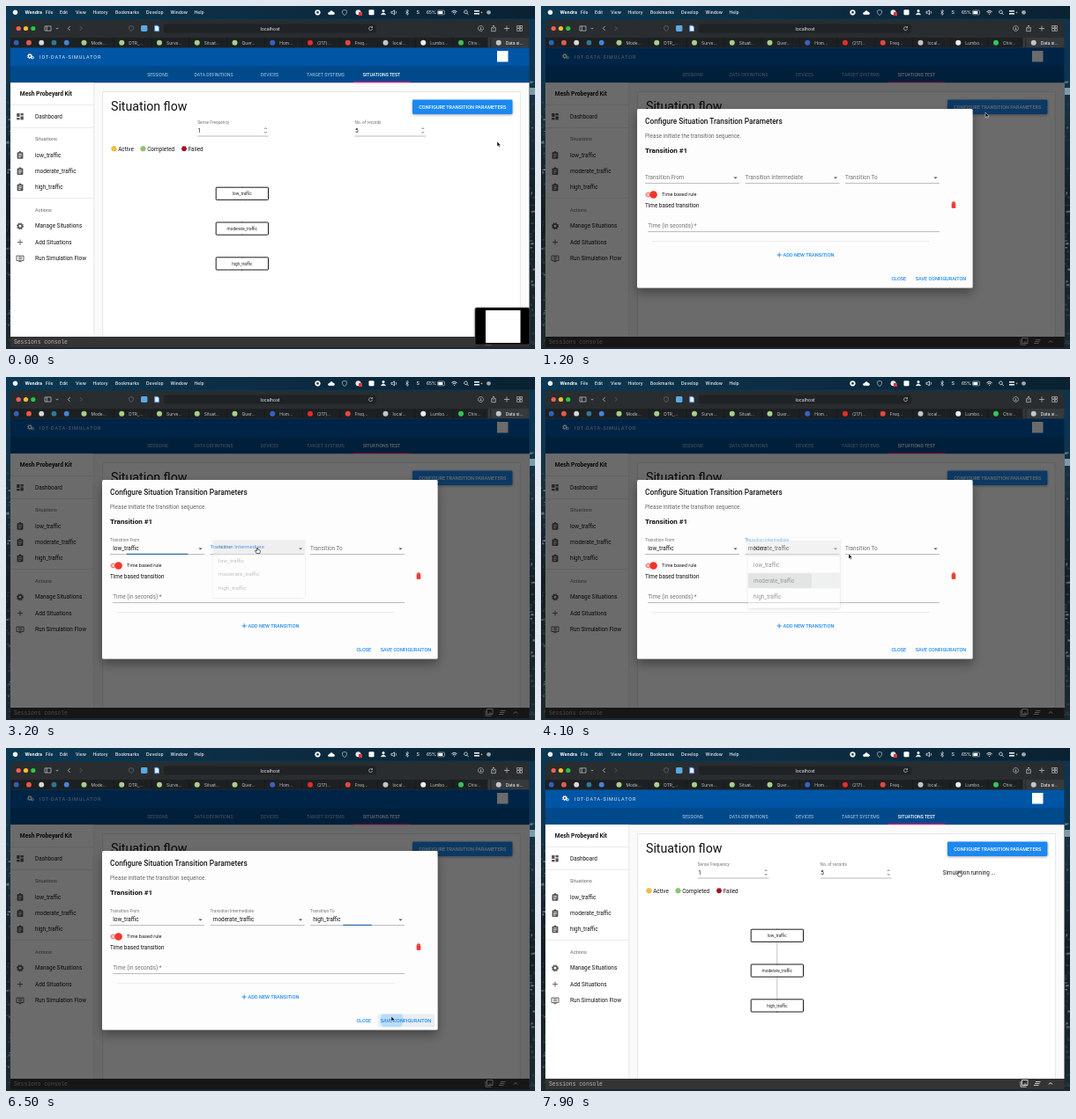
Animation, 600 px wide and 390 px high, one loop 8000 ms. Source, as an HTML page:

```html
<!DOCTYPE html>
<html lang="en">
<head>
<meta charset="utf-8">
<title>Situation flow</title>
<style>
  html, body { margin: 0; height: 100%; overflow: hidden; background: #0c2b40; }
  svg { display: block; width: 100vw; height: 100vh; }
  text { font-family: Roboto, sans-serif; white-space: pre; }
  .ui { font-family: Inter, sans-serif; }
  .mono { font-family: "Liberation Mono", monospace; }
</style>
</head>
<body>
<svg viewBox="0 0 600 390">
  <defs>
    <linearGradient id="wall" x2="0" y2="1">
      <stop offset="0" stop-color="#0d3550"/><stop offset=".2" stop-color="#0e3550"/>
      <stop offset=".3" stop-color="#18303e"/><stop offset=".6" stop-color="#141d24"/>
      <stop offset="1" stop-color="#1b2930"/>
    </linearGradient>
    <linearGradient id="bar">
      <stop offset="0" stop-color="#0b3853"/><stop offset=".5" stop-color="#0d2c42"/>
      <stop offset="1" stop-color="#0a2231"/>
    </linearGradient>
    <filter id="soft" x="-10%" y="-10%" width="120%" height="130%">
      <feDropShadow dx="0" dy="1" stdDeviation="1.4" flood-opacity=".35"/>
    </filter>
    <filter id="deep" x="-10%" y="-10%" width="120%" height="130%">
      <feDropShadow dx="0" dy="6" stdDeviation="6" flood-opacity=".35"/>
    </filter>
  </defs>
  <g id="page"></g>
  <g id="live"></g>
</svg>
<script>
const BLUE = '#1e88f0', INK = '#161616', GREY = '#757575', RED = '#f3352f';
const LOOP = 8000, TICK = 100;
const OPTIONS = ['None', 'low_traffic', 'moderate_traffic', 'high_traffic'];

// Markup helpers
const rect = (x, y, w, h, fill, extra = '') =>
  `<rect x="${x}" y="${y}" width="${w}" height="${h}" fill="${fill}" ${extra}/>`;
const dot = (x, y, r, fill, extra = '') => `<circle cx="${x}" cy="${y}" r="${r}" fill="${fill}" ${extra}/>`;
const text = (x, y, size, str, fill = INK, extra = '') =>
  `<text x="${x}" y="${y}" font-size="${size}" fill="${fill}" ${extra}>${str}</text>`;
const line = (x1, y1, x2, y2, color, w = .6) =>
  `<path d="M${x1} ${y1}L${x2} ${y2}" stroke="${color}" stroke-width="${w}"/>`;
const icon = (x, y, d, color, w = .8, fill = 'none') =>
  `<path transform="translate(${x} ${y})" d="${d}" stroke="${color}" stroke-width="${w}" fill="${fill}"/>`;
const group = (opacity, body, extra = '') => opacity > 0 ? `<g opacity="${opacity}" ${extra}>${body}</g>` : '';
const MEDIUM = 'font-weight="500"', BOLD = 'font-weight="700"', MID = 'text-anchor="middle"';

const PLUS = 'M-3 0H3M0-3V3';
const RING = 'M2.3 0A2.3 2.3 0 1 1 2.3-.1Z';
const CHEVRON = 'M-2 1L0-1L2 1';

// Motion helpers
const clamp = v => Math.max(0, Math.min(1, v));
const ramp = (t, from, length) => clamp((t - from) / length);
const ease = p => p * p * (3 - 2 * p);

// Rocky desktop showing at the window's edges
function wallpaper() {
  let seed = 7, out = rect(0, 0, 600, 390, 'url(#wall)');
  const random = () => (seed = seed * 16807 % 2147483647) / 2147483647;
  for (let i = 0; i < 120; i++) {
    const x = (i % 2 ? 593.5 : 0) + random() * 4, y = 85 + random() * 300;
    out += rect(x, y, 1 + random() * 3, .6 + random() * 2, random() < .2 ? '#8fa0a6' : '#33444d', 'opacity=".6"');
  }
  return out + rect(594, 93, 6, 8, '#7d9ca8');
}

function menuBar() {
  const menus = [['File', 45], ['Edit', 61], ['View', 79], ['History', 98.5], ['Bookmarks', 124],
    ['Develop', 159], ['Window', 186.5], ['Help', 213.5]];
  return rect(0, 0, 600, 14.5, 'url(#bar)') +
    dot(10.5, 7.3, 2.7, '#f4f4f4') +
    text(21.5, 9.2, 5.1, 'Wendra', '#fff', 'class="ui" font-weight="700"') +
    menus.map(([s, x]) => text(x, 9.2, 5, s, '#f2f2f2', 'class="ui" font-weight="500"')).join('') +
    dot(353.5, 7.3, 3.1, '#fff') + rect(352.3, 6.1, 2.4, 2.4, '#173347') +
    icon(369, 7.5, 'M-3 2.2Q-5 0-2-.6Q0-4 2-.8Q5 0 3 2.2Z', '#fff', .3, '#fff') +
    icon(384, 7.3, 'M0-3L2.5-2V0Q2 2.5 0 3.3Q-2 2.5-2.5 0V-2Z', '#b5c1c8', .7) +
    dot(399.5, 7.3, 3, '#e8e8e8') + rect(400, 7, 4, 4, '#d93636') +
    rect(411.5, 4.3, 6, 6, '#fff', 'rx="1"') +
    dot(428, 5.5, 1.5, '#fff') + icon(428, 9.8, 'M-2.8 0Q0-4 2.8 0Z', '#fff', .4, '#fff') +
    icon(440, 7.3, 'M-3-1H-1.5L.5-2.5V2.5L-1.5 1H-3ZM2-1.5Q3.2 0 2 1.5', '#fff', .7) +
    icon(455, 7.3, 'M-1.6-1.5L1.6 1.5L0 3V-3L1.6-1.5L-1.6 1.5', '#fff', .6) +
    text(465.5, 9.4, 5.6, 'S', '#fff') +
    text(477, 9.2, 5, '65%', '#fff', 'class="ui"') +
    rect(489.5, 5, 8, 4.8, 'none', 'rx="1" stroke="#ccc" stroke-width=".6"') + rect(490.3, 5.8, 5, 3.2, '#fff') +
    icon(508.5, 8, 'M-3-1.5Q0-4 3-1.5M-1.8 0Q0-1.8 1.8 0M-.4 1.4H.4', '#fff', .9) +
    icon(521.5, 6.8, 'M1.8 0A1.8 1.8 0 1 1 1.8-.1M1.3 1.3L3 3', '#fff') +
    icon(534, 7.3, 'M-3-1.5H3M-3 1.5H3', '#fff', 1.4) + dot(539.5, 7.3, .9, '#f2a02d') + dot(547.5, 7.3, 2.4, '#9aa7b5');
}

function browser() {
  const pins = ['#2c62bd', '#e45a4f', '#d8d8d8', '#2f7897', '#4485da'];
  const tabs = [['Mode...', '#a6d08a'], ['DTR_...', '#a6d08a'], ['Surve...', '#a6d08a'], ['Situat...', '#a6d08a'],
    ['Quer...', '#a6d08a'], ['Hom...', '#3563c7'], ['(217)...', '#e52d27'], ['Freq...', '#e4473f'],
    ['local...', '#c5c5c5'], ['Lumbo...', '#eeeeee'], ['Chiv...', '#35c45b'], ['Data si...', '#c5c5c5']];
  const c = '#c9c9c9';
  return rect(5, 16, 588.5, 372, '#292d2f', 'rx="4"') + rect(5, 36, 588.5, 11.5, '#1d2022') +
    ['#ff5f57', '#febc2e', '#28c840'].map((f, i) => dot(14.2 + i * 8.3, 25.5, 2.6, f)).join('') +
    icon(47.5, 25.5, 'M-3.5-2.6H3.5V2.6H-3.5ZM-1.2-2.6V2.6', c, .7) + icon(58, 25.5, 'M-1.3-.7L0 .7L1.3-.7', c, .7) +
    icon(71.5, 25.5, 'M1.2-2.4L-1.2 0L1.2 2.4', c) + icon(85, 25.5, 'M-1.2-2.4L1.2 0L-1.2 2.4', '#666') +
    icon(142, 25.5, 'M0-3L2.4-2V0Q2 2.4 0 3Q-2 2.4-2.4 0V-2Z', '#6a6a6a', .7) +
    rect(153, 22, 7.4, 7, '#5aa9e0', 'rx="1.4"') + icon(171, 25.5, 'M-2.3-3.2H1L2.5-1.5V3.2H-2.3Z', '#4d91ef', .9, '#e9f2ff') +
    rect(179, 20.5, 241, 10, '#1f2325', 'rx="2.2"') +
    text(299.5, 27.6, 5.2, 'localhost', '#f0f0f0', `class="ui" ${MID}`) +
    icon(413.5, 25.5, 'M1.7-1A2 2 0 1 0 2 .5M2-2.4V-.8H.5', c, .7) +
    icon(538.5, 25.5, 'M3 0A3 3 0 1 1 3-.1M0-1.6V1.5M-1.2.4L0 1.6L1.2.4', c, .6) +
    icon(553, 25.5, 'M-1-1H-2.3V3.2H2.3V-1H1M0 1V-3.4M-1.3-2.2L0-3.5L1.3-2.2', c, .7) +
    icon(568, 25.5, PLUS, c, .7) +
    [-1.7, 1.7].map(a => [-1.7, 1.7].map(b => rect(581.4 + a, 24 + b, 2.6, 2.6, 'none', `stroke="${c}" stroke-width=".6"`)).join('')).join('') +
    pins.map((f, i) => dot(11.7 + i * 14.25, 41.7, 2.9, f)).join('') +
    rect(546.5, 36, 47, 11.5, '#363a3c') +
    tabs.map(([s, f], i) => {
      const x = 88.5 + i * 42.75;
      return (i ? line(x - 9, 36.5, x - 9, 47, '#111', .5) : '') + dot(x, 41.7, 3, f) +
        text(x + 8, 43.5, 4.9, s, i == 11 ? '#fff' : '#c4c4c4', 'class="ui"');
    }).join('');
}

function header() {
  const links = ['SESSIONS', 'DATA DEFINITIONS', 'DEVICES', 'TARGET SYSTEMS', 'SITUATIONS TEST'];
  return rect(5, 47.5, 588.5, 20.5, '#0055a5') + rect(5, 68, 588.5, 19.2, '#004a8c') +
    gear(27, 57, 1.7, '#fff') + gear(30.3, 58.7, 1, '#fff') +
    text(38, 59.6, 5.5, 'IOT-DATA-SIMULATOR', '#e5effa', 'letter-spacing=".9"') +
    rect(557, 51, 12.5, 12.5, '#fff') +
    links.map((s, i) => text(172 + i * 63.5, 80, 5.15, s, i == 4 ? '#fff' : '#b5cce2', `${MID} ${i == 4 ? MEDIUM : ''}`)).join('') +
    rect(394, 85.8, 64, 1.4, '#e5127d');
}

const gear = (x, y, r, color) =>
  dot(x, y, r, 'none', `stroke="${color}" stroke-width="${r * .7}"`) +
  dot(x, y, r * 1.45, 'none', `stroke="${color}" stroke-width="${r * .6}" stroke-dasharray="${r * .57}"`);

function sidebar() {
  const dark = '#555';
  const items = [['Dashboard', 127.7], ['low_traffic', 171.6], ['moderate_traffic', 189.9], ['high_traffic', 208.1],
    ['Manage Situations', 252.2], ['Add Situations', 270.5], ['Run Simulation Flow', 288.8]];
  const clip = y => rect(12.6, y - 3.4, 6.8, 7.4, dark, 'rx=".8"') + dot(16, y - 3.5, 1.2, dark) +
    icon(16, y, 'M-1.9-1.3H1.9M-1.9.5H1.9M-1.9 2.2H.7', '#fff', .8);
  return rect(5, 87.2, 588.5, 288.8, '#fafafa') + rect(5, 87.2, 94.5, 288.8, '#fff') + line(99.7, 87.2, 99.7, 376, '#dcdcdc') +
    text(15.8, 102.2, 6.7, 'Mesh Probeyard Kit', '#111', BOLD) +
    [112.5, 138.5, 218.5].map(y => line(5, y, 99.5, y, '#dedede')).join('') +
    items.map(([s, y]) => text(33, y, 6.4, s)).join('') +
    text(33, 153.2, 5.6, 'Situations', '#666') + text(33, 233.6, 5.6, 'Actions', '#666') +
    rect(12.2, 122, 3.3, 4, dark) + rect(12.2, 127, 3.3, 2.4, dark) + rect(16.5, 122, 3.3, 2.4, dark) + rect(16.5, 125.4, 3.3, 4, dark) +
    [169.7, 188, 206.2].map(clip).join('') + gear(16, 250.3, 2.3, dark) + icon(16, 268.6, PLUS, dark, .9) +
    icon(16, 287, 'M-4-3H4V2.5H-4ZM-1.5 3.7H1.5M-2-1.3H2.3M-2 .6H2.3', dark, .9);
}

function flowCard() {
  const legend = [['Active', 122.5, '#fbc02d'], ['Completed', 155.5, '#8cc66d'], ['Failed', 202, '#a5151f']];
  return rect(109.7, 97.5, 473.6, 279, '#fff', 'stroke="#e2e2e2" stroke-width=".8"') +
    text(119, 119.4, 14.2, 'Situation flow', '#111') +
    rect(461, 106.6, 113.5, 16.4, BLUE, 'rx="1.4" filter="url(#soft)"') +
    text(517.8, 116.8, 5.5, 'CONFIGURE TRANSITION PARAMETERS', '#fff', `${MID} ${MEDIUM}`) +
    legend.map(([s, x, f]) => icon(x, 162.2, 'M-3.2 0L-1.6-2.8H1.6L3.2 0L1.6 2.8H-1.6Z', '#0004', .4, f) +
      text(x + 4.7, 164.6, 6.4, s)).join('') +
    OPTIONS.slice(1).map((s, i) => {
      const y = 206.2 + i * 39.8;
      return rect(238.2, y, 59.3, 14.2, '#fff', 'rx=".8" stroke="#1a1a1a"') +
        dot(267.8, y, .8, '#555') + dot(267.8, y + 14.2, .8, '#555') +
        text(267.8, y + 8.7, 4.73, s, '#222', MID);
    }).join('');
}

function consoleBar() {
  return rect(5, 376, 588.5, 12, '#343434') +
    text(9, 384, 6.35, 'Sessions console', '#b5b5b5', 'class="mono"') +
    icon(548, 381.5, 'M-2.5-4H4V2H-2.5ZM-4-2.5V3.7H2.5M-.5 1.6L1 0L2.5 1.6', '#eee', .8) +
    icon(562.5, 381.5, 'M-1.5-2H4M-2.5 0H3M-3.5 2H2', '#eee', .8) +
    icon(578, 381.5, CHEVRON, '#eee', 1);
}

function numberField(x, label, value) {
  return text(x, 133.5, 4.75, label, GREY) + text(x + .4, 144, 6.4, value) +
    line(x, 148, x + 80.5, 148, '#8a8a8a') +
    icon(x + 77.3, 140, 'M-1.3 0L0-1.5L1.3 0', '#555', .7) + icon(x + 77.3, 143, 'M-1.3 0L0 1.5L1.3 0', '#555', .7);
}

// Each select: left edge, label, opening, choosing and blur times, chosen option
const FADE = 300;
const SELECTS = [
  { x: 118, label: 'Transition From', open: 1950, pick: 2500, blur: 3150, choice: 1 },
  { x: 231.6, label: 'Transition Intermediate', open: 3150, pick: 3930, blur: 4650, choice: 2 },
  { x: 345, label: 'Transition To', open: 4650, pick: 5550, blur: 6400, choice: 3 },
];

function selectField(s, t) {
  const { x } = s, lift = ease(ramp(t, s.open, 150)), focused = t >= s.open && t < s.blur;
  const half = 53.5 * (t < s.blur ? ramp(t, s.pick + FADE, 150) : 1 - ramp(t, s.blur, 143)), mid = x + 53.5;
  return text(x, 197.3 - 10.4 * lift, 6.35 - 1.55 * lift, s.label, focused ? BLUE : GREY) +
    line(x, 201.6, x + 107, 201.6, '#8b8b8b') +
    (half > 0 ? line(mid - half, 201.4, mid + half, 201.4, '#2a6da8', 1.1) : '') +
    icon(x + 102.5, 195.4, 'M-2.2-1H2.2L0 1.2Z', 'none', 0, '#555') +
    (t >= s.pick ? text(x + 3.2, 197.3, 6.4, OPTIONS[s.choice]) : '');
}

function selectMenu(s, t, cursor) {
  const shown = ease(ramp(t, s.open, 150)), x = s.x + 3.3, w = 104;
  const picked = t >= s.pick - 100, hover = Math.floor((cursor.y - 186) / 18.2);
  const ripple = 72 * ramp(t, s.pick - 150, 250);
  const rows = OPTIONS.map((o, i) => {
    const y = 186 + i * 18.2;
    const fill = i == 0 ? (picked ? '#e4e4e4' : '#cbcbcb') : picked && i == s.choice ? '#dfe1e1' : i == hover ? '#f4f4f4' : '#fff';
    return rect(x, y, w, 18.2, fill) +
      (picked && i == s.choice ? rect(x, y + .8, ripple, 16.6, '#c3c5c5', 'rx="2"') : '') +
      text(x + 6.2, y + 11.4, 6.4, o, INK, i ? '' : 'font-style="italic"');
  }).join('');
  return group(shown * (1 - ramp(t, s.pick, FADE)),
    rect(x, 183, w, 79.5, '#fff', 'rx="1.4" filter="url(#soft)"') + rows,
    `transform="translate(0 ${183 * (.2 - .2 * shown)}) scale(1 ${.8 + .2 * shown})"`);
}

function dialog(t) {
  const trash = icon(468, 226.2, 'M-2.2-2.8H2.2M-.8-2.8V-3.4H.8V-2.8M-1.9-1.8H1.9V3.2H-1.9Z', RED, .8, RED);
  const saveTint = ramp(t, 6250, 100);
  return rect(109, 116.9, 380.6, 203.6, '#fdfdfd', 'rx="1.5" filter="url(#deep)"') +
    text(118, 133.5, 8.3, 'Configure Situation Transition Parameters', INK, MEDIUM) +
    text(118, 150.4, 6.37, 'Please initiate the transition sequence.', '#686868') +
    text(118, 167, 8.1, 'Transition #1', '#111', BOLD) +
    SELECTS.map(s => selectField(s, t)).join('') +
    rect(118.2, 211.7, 12, 5.6, '#f9c4c1', 'rx="2.8"') + icon(121.6, 214.5, RING, RED, .6) + dot(127.6, 214.5, 4.3, RED) +
    text(137, 216.4, 5.55, 'Time based rule') + text(118, 229.4, 6.37, 'Time based transition', '#111') + trash +
    text(121.3, 252, 6.37, 'Time (in seconds) *', GREY) + line(121.3, 256.6, 452, 256.6, '#8b8b8b') +
    line(126, 267.7, 441, 267.7, '#dcdcdc') +
    icon(270.2, 283, 'M-2.6 0H2.6M0-2.6V2.6', BLUE, .9) +
    text(274.5, 285.1, 5.6, 'ADD NEW TRANSITION', BLUE, MEDIUM) +
    text(397.5, 312.1, 5.5, 'CLOSE', BLUE, MEDIUM) +
    group(saveTint, rect(421.7, 302.6, 64.7, 14.6, '#e9eef2', 'rx="1.4"')) +
    (t >= 6400 ? `<clipPath id="save">${rect(421.7, 302.6, 64.7, 14.6, '#000')}</clipPath>` +
      dot(437.5, 309, 13 * ramp(t, 6400, 100) + 40 * ramp(t, 6500, 250), '#b9dcf7', 'clip-path="url(#save)"') : '') +
    text(424.7, 312.1, 5.5, 'SAVE CONFIGURAITON', BLUE, MEDIUM);
}

// Pointer path: time, x, y
const PATH = [[200, 557, 154], [700, 504, 121], [1350, 504, 121], [1850, 168, 194], [2050, 168, 194], [2250, 171.5, 210.5],
  [2550, 171.5, 210.5], [2950, 285, 194], [3200, 285, 194], [3500, 268, 231], [3900, 268, 231], [4100, 349, 201],
  [4400, 385, 194], [4750, 385, 194], [5200, 370.5, 248.5], [5700, 370.5, 248.5], [6250, 437, 305], [6600, 437, 305],
  [7200, 474, 139.5], [LOOP, 474, 139.5]];
const HAND = [[700, 900], [1850, 2600], [2900, 3950], [4400, 5750], [7150, LOOP]];

function pointer(t) {
  const i = Math.max(1, PATH.findIndex(p => p[0] > t));
  const [t0, x0, y0] = PATH[i - 1], [t1, x1, y1] = PATH[i], p = ease(ramp(t, t0, t1 - t0));
  return { x: x0 + (x1 - x0) * p, y: y0 + (y1 - y0) * p, hand: HAND.some(([a, b]) => t >= a && t < b) };
}

const drawPointer = c => c.hand
  ? icon(c.x, c.y, 'M-.6.6Q0-.4.7.6V2.4L2.7 2.8Q3.6 3 3.4 4.2L2.9 6.5H-.8L-2.5 3.8Q-2.6 2.8-1.5 3.3L-.6 4Z', '#111', .65, '#fff')
  : icon(c.x, c.y, 'M0 0V5.8L1.4 4.6L2.3 6.6L3.3 6.1L2.4 4.2H4.2Z', '#fff', .5, '#000');

function draw(t) {
  const cursor = pointer(t), saved = t >= 6650;
  const visible = ease(ramp(t, 900, 150)) * (1 - ease(ramp(t, 6650, 200)));
  const scale = .85 + .15 * visible, slide = 75 * ease(ramp(t, 300, 400));
  const thumb = slide < 75 ? `<g transform="translate(${slide} 0)">` +
    rect(532, 343, 62, 42.2, '#050505', 'rx="2" stroke="#555" stroke-width=".6" filter="url(#soft)"') +
    rect(544, 346, 39.5, 37, '#fff') + '</g>' : '';
  return numberField(saved ? 177.8 : 217.2, 'Sense Frequency', 1) +
    numberField(saved ? 316.8 : 395.5, 'No. of records', 5) +
    (saved ? line(267.8, 220.9, 267.8, 245.5, '#999') + line(267.8, 260.7, 267.8, 285.3, '#999') : '') +
    (t >= 7400 ? text(455.8, 144, 6.35, 'Simulation running ...') : '') +
    thumb + group(visible, rect(5, 47.5, 588.5, 340.5, '#000', 'opacity=".58"')) +
    group(visible, dialog(t), `transform="translate(${299 * (1 - scale)} ${218 * (1 - scale)}) scale(${scale})"`) +
    SELECTS.map(s => selectMenu(s, t, cursor)).join('') + drawPointer(cursor);
}

const live = document.getElementById('live');
document.getElementById('page').innerHTML =
  wallpaper() + menuBar() + browser() + header() + sidebar() + flowCard() + consoleBar();

const start = performance.now();
let last = -1;
function frame() {
  const t = Math.floor((performance.now() - start) % LOOP / TICK) * TICK;
  if (t !== last) live.innerHTML = draw(last = t);
  requestAnimationFrame(frame);
}
frame();
</script>
</body>
</html>
```
